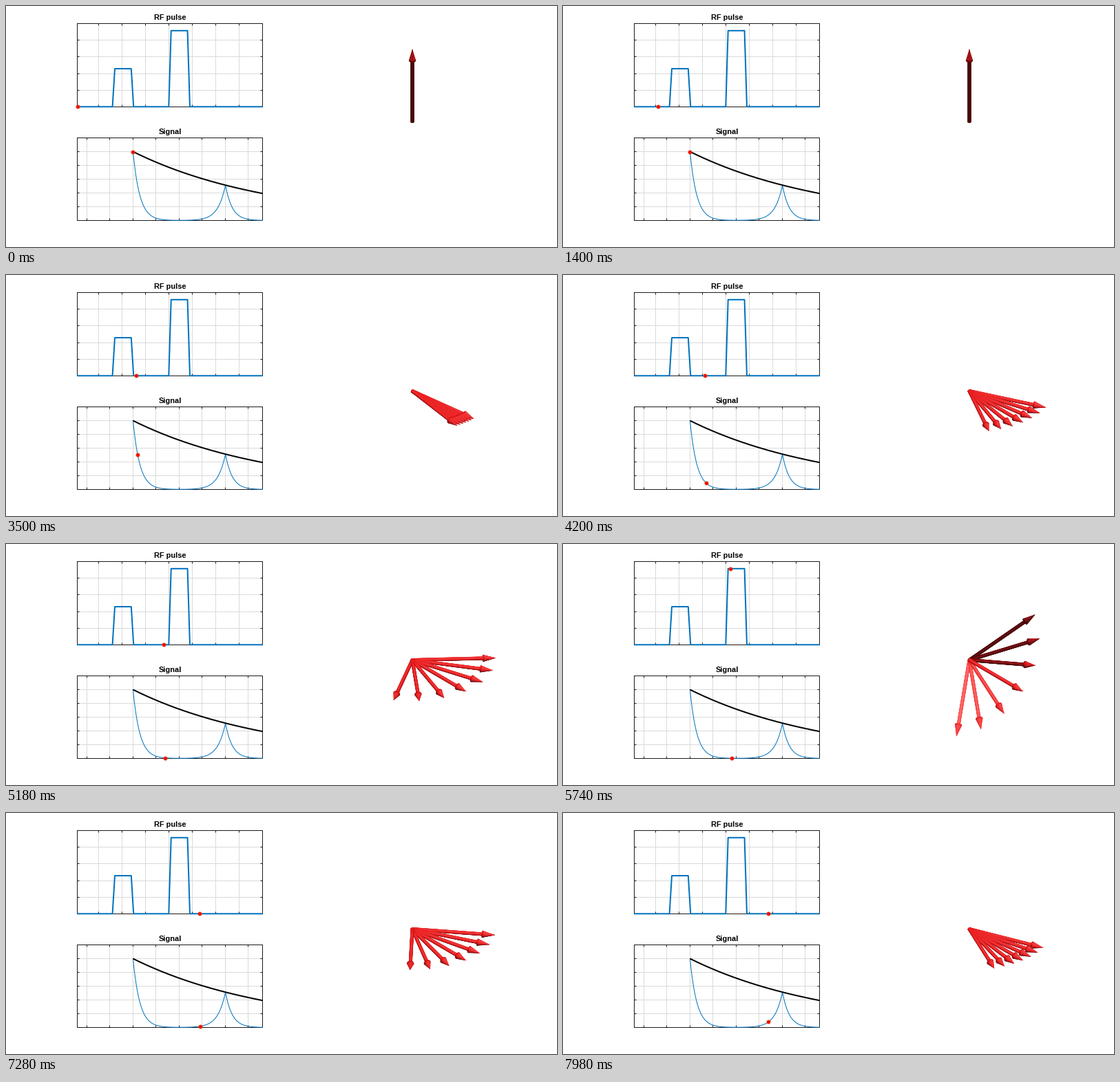
Animation, 800 px wide and 350 px high, one loop 8 s. Source, as a matplotlib script:

```python
import numpy as np
import matplotlib.pyplot as plt
from matplotlib.animation import FuncAnimation
from matplotlib.collections import LineCollection, PolyCollection

W, H, DPI = 800, 350, 100
PX = 72 / DPI
TICK, HOLD, LOOP = 20, 140, 8000

BLUE, GRID, INK = "#0072bd", "#dadada", "#1c1c1c"
LEFT, RIGHT = 103.5, 372.5
RF_TOP, RF_BASE = 25.5, 146.5
SIG_TOP, SIG_BASE = 191.5, 311.5
RF_DX, SIG_DX = (RIGHT - LEFT) / 79, 3.355

# step numbers of the sequence
EXC, EXC_END, INV, INV_END = 15, 23, 39, 47
SIG_X0 = 184.4
T2, T2_FAST = 60, 3.1
ECHO = 40

# spin vectors in an orthographic view
ORIGIN = np.array([590.0, 168.5])
LENGTH, ELEV, AZIM = 120.5, np.radians(29.5), np.radians(50)
DRIFT = np.radians(1.26)
SHAFT_R, HEAD_R, HEAD_LEN = 2.3, 5.0, 0.15
LIGHT = np.array([0.2, -0.98])
RAMP = np.array([(62, 0, 2), (232, 22, 24), (255, 95, 95)]) / 255

fig = plt.figure(figsize=(W / DPI, H / DPI), dpi=DPI, facecolor="white")
ax = fig.add_axes([0, 0, 1, 1])
ax.set_xlim(0, W)
ax.set_ylim(H, 0)
ax.axis("off")


def panel(title, top, base, xs, ys, baseline):
    """Grid, box, inward ticks and title of one plot."""
    xs, ys = np.floor(xs) + 0.5, np.floor(ys) + 0.5
    grid = [[(x, top), (x, base)] for x in xs]
    grid += [[(LEFT, y), (RIGHT, y)] for y in ys]
    box = [[(LEFT, top), (RIGHT, top), (RIGHT, base), (LEFT, base), (LEFT, top)]]
    n = 3
    for x in xs:
        box += [[(x, top), (x, top + n)], [(x, base), (x, base - n)]]
    for y in ys:
        box += [[(LEFT, y), (LEFT + n, y)], [(RIGHT, y), (RIGHT - n, y)]]
    for lines, color, z in ((grid, GRID, 1), (box, INK, 2)):
        ax.add_collection(LineCollection(lines, colors=color, linewidths=PX,
                                         snap=False, zorder=z))
    ax.text((LEFT + RIGHT) / 2, baseline, title, ha="center", va="baseline",
            family="Liberation Sans", weight="bold", size=11 * PX, color="black")


def rf_point(step):
    level = 0.5 * (EXC < step <= EXC_END) + 1.0 * (INV < step <= INV_END)
    return LEFT + RF_DX * step, RF_BASE - 0.2 - 110.5 * level


def envelope(t):
    return 100 * np.exp(-t / T2)


def signal(t):
    fast = np.exp(-t / T2_FAST) + np.exp(-np.abs(t - ECHO) / T2_FAST)
    return envelope(t) * np.minimum(fast, 1)


def sig_point(step):
    t = max(step - EXC_END, 0)
    return SIG_X0 + SIG_DX * t, SIG_BASE - signal(t)


panel("RF pulse", RF_TOP, RF_BASE, LEFT + RF_DX * np.arange(9, 79, 10),
      np.linspace(RF_TOP, RF_BASE, 6)[1:-1], 20)
panel("Signal", SIG_TOP, SIG_BASE, 117.3 + 33.5 * np.arange(8),
      np.linspace(SIG_TOP, SIG_BASE, 7)[1:-1], 186)

ax.plot(*zip(*[rf_point(s) for s in range(80)]), color=BLUE, lw=2 * PX,
        solid_capstyle="butt", snap=False, zorder=3)
t = np.linspace(0, (RIGHT - SIG_X0) / SIG_DX, 600)
ax.plot(SIG_X0 + SIG_DX * t, SIG_BASE - signal(t), color=BLUE, lw=PX, zorder=3)
ax.plot(SIG_X0 + SIG_DX * t, SIG_BASE - envelope(t), color="black", lw=2 * PX,
        solid_capstyle="butt", zorder=4)

dots, = ax.plot([], [], "o", ms=5 * PX, mfc="#ff0000", mec="#e03a10",
                mew=PX, snap=False, zorder=5)
spins = PolyCollection([], linewidths=0.3, zorder=6)
ax.add_collection(spins)


def vectors(step):
    """Unit vectors (along the excited axis, across it, up) of the spins."""
    if step <= EXC_END:
        tilt = np.pi / 2 * np.clip((step - EXC) / (EXC_END - EXC), 0, 1)
        return [(np.sin(tilt), 0, np.cos(tilt))]
    drift = DRIFT * (min(step, INV) - EXC_END)
    flip = np.pi * np.clip((step - INV) / (INV_END - INV), 0, 1)
    back = DRIFT * max(step - INV_END, 0)
    out = []
    for k in range(-3, 4):
        u, w = np.cos(k * drift), np.sin(k * drift)
        w, z = w * np.cos(flip), w * np.sin(flip)
        c, s = np.cos(k * back), np.sin(k * back)
        out.append((u * c - w * s, u * s + w * c, z))
    return out


def project(v):
    """Screen offset of a unit vector and its component towards the viewer."""
    u, w, z = v
    x = u * np.cos(AZIM) + w * np.sin(AZIM)
    y = u * np.sin(AZIM) - w * np.cos(AZIM)
    screen = np.array([x, y * np.sin(ELEV) - z * np.cos(ELEV)])
    return screen * LENGTH, y * np.cos(ELEV) + z * np.sin(ELEV)


def tone(lum):
    lum = np.clip(lum, 0, 1)
    return [np.interp(lum, (0, 0.5, 1), RAMP[:, c]) for c in range(3)]


def arrow(offset, depth, z):
    """Shaded strips of a shaft and a cone, back to front."""
    axis = offset / np.hypot(*offset)
    perp = np.array([-axis[1], axis[0]])
    tip, neck = ORIGIN + offset, ORIGIN + offset * (1 - HEAD_LEN)
    psi = np.linspace(0, np.pi, 9)
    mid = (psi[1:] + psi[:-1]) / 2

    def rim(center, r, a):
        return (center + r * np.outer(np.cos(a), perp)
                - r * depth * np.outer(np.sin(a), axis))

    side = perp @ LIGHT * np.cos(mid)
    gain = 0.04 + 0.2 * (1 - max(z, 0)) ** 2
    shade = gain * (side + 1.2 * (np.sin(mid) - 0.6))
    body = np.interp(z, (-0.6, -0.3, 0, 0.24, 0.6, 1), (0.9, 0.75, 0.47, 0.1, 0.03, 0))
    cap = np.interp(z, (-0.6, 0, 0.6, 1), (0.72, 0.48, 0.1, 0.27))

    lo, hi = rim(ORIGIN, SHAFT_R, psi), rim(neck, SHAFT_R, psi)
    shaft = [([lo[i], lo[i + 1], hi[i + 1], hi[i]], tone(body + shade[i]))
             for i in range(len(mid))]

    edge = rim(neck, HEAD_R, psi)
    front = edge + 0.12 * (tip - edge)
    glow = shade + 0.08 * side
    cone = [([edge[i], edge[i + 1], front[i + 1], front[i]],
             tone(cap - 0.17 + shade[i])) for i in range(len(mid))]
    cone += [([front[i], front[i + 1], tip], tone(cap + glow[i]))
             for i in range(len(mid))]
    if depth >= 0:
        return shaft + cone
    disc = rim(neck, HEAD_R, np.linspace(0, 2 * np.pi, 20))
    return cone + [(disc, tone(body - 0.12))] + shaft


def update(i):
    step = i * TICK // HOLD
    dots.set_data(*zip(rf_point(step), sig_point(step)))
    items = sorted(((*project(v), v[2]) for v in vectors(step)), key=lambda a: a[1])
    parts = [p for item in items for p in arrow(*item)]
    colors = [c for _, c in parts]
    spins.set_verts([p for p, _ in parts])
    spins.set_facecolor(colors)
    spins.set_edgecolor(colors)
    return dots, spins


anim = FuncAnimation(fig, update, frames=LOOP // TICK, interval=TICK,
                     repeat=True, repeat_delay=0, blit=False)
plt.show()
```
